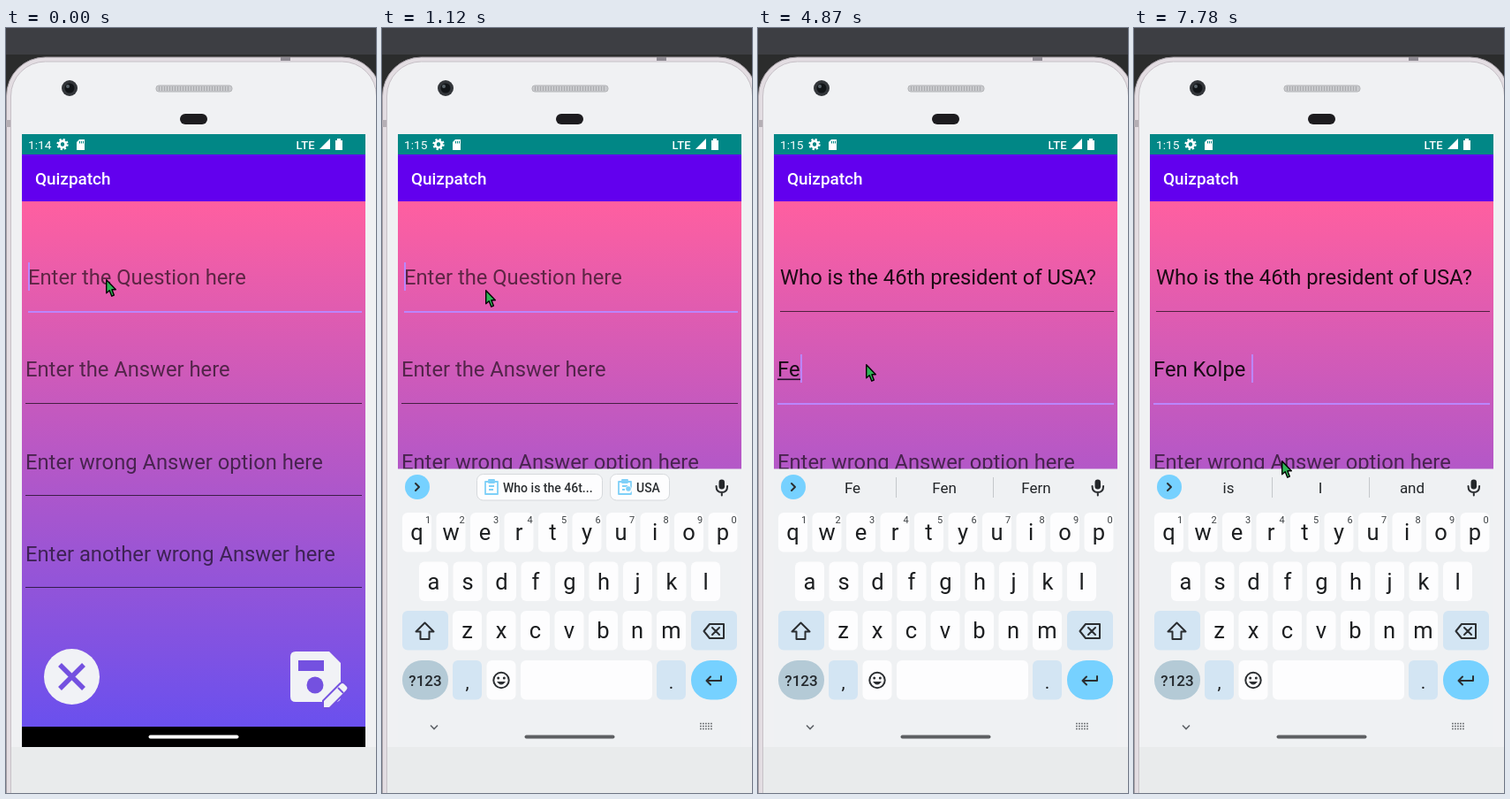
Animation, 419 px wide and 865 px high, one loop 8000 ms. Source, as an HTML page:

```html
<!DOCTYPE html>
<html lang="en">
<head>
<meta charset="utf-8">
<title>Card editor</title>
<style>
html, body { margin: 0; width: 100%; height: 100%; overflow: hidden; background: #2b2c2c; }
svg { display: block; width: 419px; height: 865px; font-family: Roboto, sans-serif; }
.field { font-size: 23.75px; fill: #000; }
.hint { fill-opacity: .6; }
.value { fill-opacity: .88; }
.mid { text-anchor: middle; }
.key { font-size: 25.5px; fill: #1c1e20; text-anchor: middle; }
.word { font-size: 17px; fill: #222528; text-anchor: middle; }
.ink { fill: none; stroke: #2b2e31; stroke-width: 2; stroke-linecap: round; stroke-linejoin: round; }
</style>
</head>
<body>
<svg id="stage" viewBox="0 0 419 865"></svg>
<script>
const LOOP = 8000;
const ACCENT = '#bb86fc';

const rect = (x, y, w, h, fill, r = 0, extra = '') =>
  `<rect x="${x}" y="${y}" width="${w}" height="${h}" rx="${r}" fill="${fill}" ${extra}/>`;
const circle = (x, y, r, fill, extra = '') =>
  `<circle cx="${x}" cy="${y}" r="${r}" fill="${fill}" ${extra}/>`;
const path = (d, extra = 'class="ink"') => `<path d="${d}" ${extra}/>`;
const text = (x, y, str, cls, extra = '') =>
  `<text x="${x}" y="${y}" class="${cls}" ${extra}>${str}</text>`;
const group = (id, body) => `<g id="${id}">${body}</g>`;

function gear(x, y, r, color, hole) {
  const dash = (Math.PI * r) / 8;
  return circle(x, y, r, 'none', `stroke="${color}" stroke-width="${r * .42}" stroke-dasharray="${dash}"`) +
    circle(x, y, r * .65, 'none', `stroke="${color}" stroke-width="${r * .5}"`) + circle(x, y, r * .35, hole);
}

const clipboard = (x, y, color) =>
  path(`M${x - 7} ${y - 6}h14v14h-14zM${x - 3} ${y - 8}h6v3h-6zM${x - 3} ${y - 1}h6M${x - 3} ${y + 3}h5`,
    `fill="none" stroke="${color}" stroke-width="1.8" stroke-linejoin="round"`);

function phone() {
  return rect(0, 0, 419, 865, '#2b2c2c') + rect(0, 0, 419, 30, '#3d3e43') +
    rect(.5, 33, 424, 900, '#e3dde2', 44, 'stroke="#a59ea5"') +
    rect(5.5, 38, 414, 900, '#f0f1f3', 39, 'stroke="#c6c0c6"') +
    rect(0, 104, 5, 8, '#b5afb5') + rect(311, 33, 11, 4, '#8e8991') +
    rect(6, 813, 413, 52, '#e9ebec') +
    circle(72, 68, 9, '#33363a') + circle(72, 68, 5.5, '#111417') + circle(70, 66, 2, '#59636a') +
    rect(170, 65, 86, 7, '#c9cacd', 3, 'stroke="#b4b5b8"') +
    path('M173 68.5H254', 'stroke="#aaabae" stroke-width="5" stroke-dasharray="1 2"') +
    rect(197, 97, 31, 12, '#1d1c1f', 6);
}

function appBars() {
  return rect(18, 120, 389, 23, '#018786') + rect(18, 143, 389, 53, '#6200ee') +
    text(25, 136.5, '', '', 'id="clock" font-size="13.7" fill="#fff"') +
    gear(64, 131.5, 5.5, '#fff', '#018786') +
    path('M83 126h6v12h-9v-9z', 'fill="#fff"') +
    path('M83.5 128v2.5M85.5 128v2.5M87.5 128v2.5', 'stroke="#018786"') +
    text(328.5, 136.5, 'LTE', '', 'font-size="13" font-weight="500" fill="#fff"') +
    path('M367 125v12h-12z', 'fill="#fff"') +
    path('M373 127h2v-2h4v2h2v11h-8z', 'fill="#fff"') +
    text(33, 176.5, 'Quizpatch', '', 'font-size="18.9" font-weight="500" fill="#fff"');
}

function form() {
  const line = (x, y) => rect(x, y, 403 - x, 1, '#000', 0, 'fill-opacity=".65"');
  const purple = '#7451e0', white = '#f1f2f6';
  return rect(18, 196, 389, 594, 'url(#sky)') +
    text(25, 290, '', 'field', 'id="question"') + text(22, 394, '', 'field', 'id="answer"') +
    text(22, 498.5, 'Enter wrong Answer option here', 'field hint') +
    text(22, 602.5, 'Enter another wrong Answer here', 'field hint') +
    line(25, 320) + line(22, 424) + line(22, 528) + line(22, 632) +
    rect(25, 320, 378, 2, ACCENT, 0, 'id="focus1"') + rect(22, 424, 381, 2, ACCENT, 0, 'id="focus2"') +
    rect(22, 396.5, 0, 1.6, '#24102c', 0, 'id="compose"') + rect(0, 0, 2, 32, ACCENT, 0, 'id="caret"') +
    circle(74.5, 733.5, 31.5, white) +
    path('M61 720l27 27M88 720l-27 27', `stroke="${purple}" stroke-width="5.5"`) +
    path('M328 705h38l13 13v38q0 6-6 6h-45q-6 0-6-6v-45q0-6 6-6z', `fill="${white}"`) +
    rect(331, 715, 29, 12, purple) + circle(350, 743, 9.5, purple) +
    path('M360 768v-7l19-19q2-2 4 0l3 3q1 2-1 4l-19 19z', `fill="${white}" stroke="${purple}" stroke-width="4" paint-order="stroke"`) +
    path('M376 746l6 6', `stroke="${purple}" stroke-width="2"`) +
    rect(18, 790, 389, 23, '#000');
}

function keys() {
  const pitch = 38.5, blue = '#d3e5f3';
  const row = (letters, x, y, numbered) => [...letters].map((c, i) =>
    rect(x + i * pitch, y, 33, 44.5, '#fdfdfe', 6) +
    text(x + 16.5 + i * pitch, y + 31, c, 'key') +
    (numbered ? text(x + 29 + i * pitch, y + 12, (i + 1) % 10, 'mid', 'font-size="11" fill="#3c4043"') : '')
  ).join('');
  const dots = [0, 1, 2].map(r => path(`M360 ${786.5 + r * 3}h14`,
    'stroke="#6a6d70" stroke-width="1.7" stroke-dasharray="1.8 1.2"')).join('');
  return row('qwertyuiop', 23, 548, true) + row('asdfghjkl', 42, 603.5) + row('zxcvbnm', 80, 659) +
    rect(23, 659, 52, 44.5, blue, 6) + rect(350, 659, 52, 44.5, blue, 6) +
    path('M48.5 672.5l10 10h-5v8.5h-10v-8.5h-5z') +
    path('M371 674h16v16h-16l-6.5-8zM374 678l8 8M382 678l-8 8') +
    rect(23, 715, 52, 44.5, '#b4cad6', 22) +
    text(49, 743.5, '?123', 'mid', 'font-size="17" font-weight="500" fill="#23282c"') +
    rect(80, 715, 33, 44.5, blue, 6) + text(96.5, 747, ',', 'key', 'style="font-size:21px"') +
    rect(118.5, 715, 33, 44.5, '#fdfdfe', 6) +
    circle(135, 737.5, 8.7, 'none', 'class="ink"') +
    circle(131.7, 735, 1.5, '#2b2e31') + circle(138.3, 735, 1.5, '#2b2e31') +
    path('M130 739q5 7 10 0z', 'fill="#2b2e31"') +
    rect(157, 715, 149, 44.5, '#fdfdfe', 6) +
    rect(311, 715, 33, 44.5, blue, 6) + text(327.5, 747, '.', 'key', 'style="font-size:21px"') +
    rect(350, 715, 52, 44.5, '#76d1ff', 22) +
    path('M384 733v5h-16M372 733.5l-4.5 4.5 4.5 4.5') +
    path('M55 788.5l4 4 4-4', 'fill="none" stroke="#5f6368" stroke-width="1.6"') + dots;
}

function suggestions() {
  const chip = (x, w) => rect(x, 504.5, w, 29.5, '#fdfdfe', 7, 'stroke="#d6d9dc"');
  const label = (x, str) => text(x, 525, str, '', 'font-size="14" font-weight="500" fill="#2b2e31"');
  const bar = x => rect(x, 508, 1, 23, '#c4c8cb');
  return circle(40, 519, 14, '#76d1ff') + path('', 'id="chevron" class="ink"') +
    rect(381.5, 510.5, 6.5, 11, '#24272a', 3.2) + path('M378.5 518q0 7 6.3 7t6.3-7M384.8 525v3.5') +
    group('chips',
      group('chip1', chip(107.5, 142) + clipboard(124, 519, '#7fd0f8') + label(137, 'Who is the 46t...')) +
      group('chip2', chip(258.5, 67) + clipboard(275, 519, '#7fd0f8') +
        circle(279, 522, 4, '#fdfdfe') + circle(279, 521, 2.8, '#7fd0f8') + label(288, 'USA')) +
      circle(184, 514, 13, '#000', 'id="ripple" fill-opacity=".08"')) +
    group('tools',
      path('M87.5 512h15v9l-5 5h-10zM97.5 526v-5h5M91 516h1M97 516h1M91 520q3 3 6 0') +
      text(150.5, 524.5, 'GIF', 'mid', 'font-size="14.5" font-weight="900" fill="#2b2e31"') +
      clipboard(206, 519, '#2b2e31') + gear(261, 519, 7.3, '#2b2e31', '#eff1f3') + bar(295) +
      [323, 329, 335].map(x => circle(x, 519, 1.9, '#2b2e31')).join('')) +
    group('words',
      rect(157, 498.5, 110, 41.5, '#b4cad6', 0, 'id="press"') + bar(156) + bar(266) +
      [107, 211, 315].map((x, i) => text(x, 526, '', 'word', `id="word${i}"`)).join(''));
}

document.getElementById('stage').innerHTML =
  `<defs><linearGradient id="sky" x2="0" y2="1"><stop stop-color="#ff5fa0"/><stop offset="1" stop-color="#6a50ee"/></linearGradient>
   <clipPath id="screen"><path d="M18 120h389v693h-389z"/></clipPath></defs>` +
  phone() + `<g clip-path="url(#screen)">` + appBars() + form() +
  group('keyboard', rect(18, 498.5, 389, 400, '#eff1f3') + suggestions() + keys()) +
  rect(161.5, 799.5, 102, 4, '#fff', 2, 'id="pill"') + '</g>' +
  path('M.7.7V15.8L4.2 12.7 6.8 19.2 9.3 18.1 6.9 11.8H11.3z',
    'id="pointer" stroke="#000" stroke-width="1.4" stroke-linejoin="round"');

// Each track lists [start ms, ...values]; values hold until the next step.
const tracks = {
  keyboard: [[0, 330], [120, 75], [240, 5.5], [390, 0]],
  chips: [[0, .4, 0], [240, .8, .37], [390, 1, 1]],
  pill: [[0, '#fff'], [520, '#c4c6c8'], [820, '#77797c'], [1120, '#5d5f62']],
  strip: [[0, 'chips'], [2180, 'tools'], [4460, 'words']],
  words: [[0, '', '', ''], [4460, 'F', 'For', 'First'], [4870, 'Fe', 'Fen', 'Fern'],
    [6100, 'is', 'Kolpe', 'and'], [6880, 'is', 'I', 'and']],
  ripple: [[0, 0], [2060, 1]],
  press: [[0, 0], [5980, 1], [6100, 0], [6500, 1], [6880, 0]],
  question: [[0, ''], [2180, 'Who is the 46th president of USA?']],
  answer: [[0, ''], [4460, 'F'], [4720, 'Fe'], [6100, 'Fen'], [6880, 'Fen Kolpe']],
  compose: [[0, 0], [4460, 13], [4870, 26], [6100, 0]],
  focus: [[0, 1], [3220, 2]],
  caretX: [[0, 25], [2180, 383], [3220, 22], [4460, 35], [4720, 48], [6100, 67], [6880, 133]],
  caretOn: [[0, 1], [390, 0], [820, 1], [1390, 0], [1820, 1], [2700, 0], [3090, 1], [3750, 0], [4320, 1],
    [5320, 0], [5860, 1], [6500, 0], [6880, 1], [7270, 0], [7780, 1]],
  pointer: [[0, 113, 284], [1120, 117, 296], [1270, 138, 362], [1390, 167, 446], [1520, 186, 498],
    [1670, 186, 503], [1820, 185, 507], [2550, 158, 458], [2700, 138, 418], [2820, 126, 390], [2940, 122, 380],
    [5320, 128, 392], [5440, 160, 442], [5560, 185, 482], [5710, 212, 521], [5860, 219, 528],
    [7150, 214, 524], [7270, 200, 515], [7390, 184, 502], [7510, 171, 492], [7660, 168, 490], [7780, 167, 489]],
  skin: [[0, '#2fb457'], [1670, '#000'], [2550, '#2fb457'], [5710, '#000'], [6500, '#3b2a22'], [7390, '#2fb457']]
};

const el = id => document.getElementById(id);
const set = (id, attrs) => { for (const k in attrs) el(id).setAttribute(k, attrs[k]); };
const show = (id, on) => set(id, { visibility: on ? 'visible' : 'hidden' });
const at = (name, t) => tracks[name].filter(step => step[0] <= t).pop().slice(1);
const scaleAt = (x, s) => `translate(${x} 519) scale(${s}) translate(${-x} -519)`;

function fill(id, value, hint) {
  el(id).textContent = value || hint;
  set(id, { class: 'field ' + (value ? 'value' : 'hint') });
}

function render(t) {
  const [strip] = at('strip', t), [focus] = at('focus', t);
  const [s1, s2] = at('chips', t), [x, y] = at('pointer', t);
  el('clock').textContent = t < 120 ? '1:14' : '1:15';
  fill('question', at('question', t)[0], 'Enter the Question here');
  fill('answer', at('answer', t)[0], 'Enter the Answer here');
  show('focus1', focus === 1);
  show('focus2', focus === 2);
  set('compose', { width: at('compose', t)[0] });
  set('caret', { x: at('caretX', t)[0], y: focus === 1 ? 265 : 369 });
  show('caret', at('caretOn', t)[0]);
  set('keyboard', { transform: `translate(0 ${at('keyboard', t)[0]})` });
  for (const id of ['chips', 'tools', 'words']) set(id, { display: id === strip ? 'inline' : 'none' });
  set('chip1', { transform: scaleAt(178.5, s1) });
  set('chip2', { transform: scaleAt(292, s2), opacity: s2 });
  set('ripple', { opacity: at('ripple', t)[0] });
  set('chevron', { d: strip === 'tools' ? 'M42 515l-4 4 4 4' : 'M38 515l4 4-4 4' });
  at('words', t).forEach((word, i) => el('word' + i).textContent = word);
  set('press', { opacity: at('press', t)[0] });
  set('pill', { fill: at('pill', t)[0] });
  set('pointer', { transform: `translate(${x} ${y})`, fill: at('skin', t)[0] });
}

function tick() {
  render(performance.now() % LOOP);
  requestAnimationFrame(tick);
}
tick();
</script>
</body>
</html>
```
